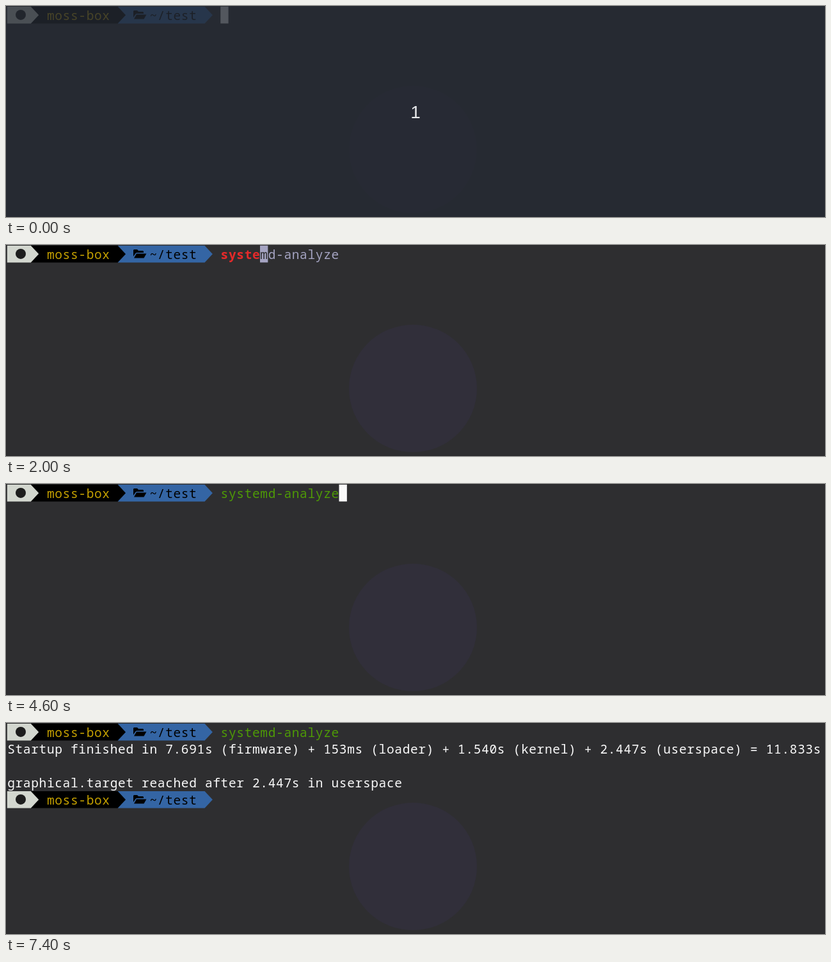
Animation of 1280x331 px, one loop 8000 ms. Source, as an HTML page with a canvas:

```html
<!DOCTYPE html>
<html lang="en">
<head>
<meta charset="utf-8">
<title>Terminal</title>
<style>
  html, body { margin: 0; width: 100%; height: 100%; overflow: hidden; background: #2e2e30; }
  canvas { display: block; }
</style>
</head>
<body>
<canvas id="stage" width="1280" height="331"></canvas>
<script>
const ctx = document.getElementById('stage').getContext('2d');
const W = 1280, H = 331, LOOP = 8000;
const LEFT = 1.8, TOP = 0.9, CELL = 12.35, ROW = 26.5;
const SIZE = 19.5, GAP = CELL - SIZE * 0.6;

const BG = '#2e2e30', EDGE = '#28282a', WHITE = '#fafafa', BLACK = '#000',
      LIGHT = '#d3d7cf', BLUE = '#3465a4', YELLOW = '#c4a000', RED = '#e52a2a',
      GREEN = '#4e9a06', GHOST = '#a5a4c2';

const HOST = 'moss-box', COMMAND = 'systemd-analyze', PROMPT_END = 27;
const OUTPUT = [
  [1, 'Startup finished in 7.691s (firmware) + 153ms (loader) + 1.540s (kernel) + 2.447s (userspace) = 11.833s'],
  [3, 'graphical.target reached after 2.447s in userspace']
];

// [start time, characters typed]
const KEYS = [[0, 0], [400, 1], [600, 2], [1400, 4], [2000, 5], [2200, 7], [2800, 9],
              [3000, 10], [3100, 11], [3700, 12], [4400, 14], [4600, 15]];
const SUGGEST_AT = 500, PRINT_AT = 5600, PROMPT_AT = 5700;
// cursor is hidden in these spans
const HIDDEN = [[1200, 1400], [5200, 5500], [6100, 6700], [7400, LOOP]];

const colX = col => LEFT + col * CELL;
const rowY = row => TOP + row * ROW;

function text(str, col, row, color, weight = 500) {
  ctx.font = `${weight} ${SIZE}px "Noto Sans Mono", "DejaVu Sans Mono", monospace`;
  ctx.letterSpacing = GAP + 'px';
  ctx.textAlign = 'left';
  ctx.fillStyle = color;
  ctx.fillText(str, colX(col) + GAP / 2, Math.round(rowY(row) + 20.9));
}

function block(col, row, color) {
  ctx.fillStyle = color;
  ctx.fillRect(colX(col), rowY(row), CELL, ROW);
}

function disc(x, y, r, color) {
  ctx.fillStyle = color;
  ctx.beginPath();
  ctx.arc(x, y, r, 0, Math.PI * 2);
  ctx.fill();
}

function polygon(points, color) {
  ctx.fillStyle = color;
  ctx.beginPath();
  points.forEach(([x, y]) => ctx.lineTo(x, y));
  ctx.closePath();
  ctx.fill();
}

// segment ending in an arrow one cell wide
function segment(from, to, row, color) {
  const x0 = colX(from), x1 = colX(to), y = rowY(row);
  polygon([[x0, y], [x1, y], [x1 + CELL, y + ROW / 2], [x1, y + ROW], [x0, y + ROW]], color);
}

function folder(x, y) {
  polygon([[x, y + 11], [x, y + 1], [x + 1, y], [x + 6, y], [x + 8, y + 2],
           [x + 15, y + 2], [x + 16, y + 3], [x + 16, y + 5], [x + 5, y + 5], [x + 3.5, y + 6]], BLACK);
  polygon([[x + 5, y + 6.5], [x + 20.5, y + 6.5], [x + 16.5, y + 13.5], [x + 1, y + 13.5]], BLACK);
}

function prompt(row) {
  const y = rowY(row);
  segment(14, 25, row, BLUE);
  segment(3, 14, row, BLACK);
  segment(0, 3, row, LIGHT);
  disc(23, y + 13, 8, '#1d1d1d');
  text(HOST, 5, row, YELLOW);
  folder(199, y + 6);
  text('~/test', 18, row, BLACK);
}

function commandLine(t, cursorOn) {
  const typed = KEYS.filter(k => k[0] <= t).pop()[1];
  const done = typed === COMMAND.length;
  const at = PROMPT_END + typed;
  const rest = t >= SUGGEST_AT ? COMMAND.slice(typed) : '';

  text(COMMAND.slice(0, typed), PROMPT_END, 0, done ? GREEN : RED, done ? 500 : 700);
  text(rest, at, 0, GHOST);
  if (cursorOn && t < PRINT_AT) {
    block(at, 0, rest ? GHOST : WHITE);
    text(rest.slice(0, 1), at, 0, BG);
  }
}

function countdown() {
  ctx.fillStyle = 'rgba(37, 42, 50, 0.78)';
  ctx.fillRect(0, 0, W, H);
  ctx.font = '28px "Liberation Sans", Arial, sans-serif';
  ctx.letterSpacing = '0px';
  ctx.textAlign = 'center';
  ctx.fillStyle = '#e8eaec';
  ctx.fillText('1', 640, 176);
}

function draw(t) {
  const cursorOn = !HIDDEN.some(([a, b]) => t >= a && t < b);
  ctx.fillStyle = BG;
  ctx.fillRect(0, 0, W, H);
  ctx.strokeStyle = EDGE;
  ctx.strokeRect(0.5, 0.5, W - 1, H - 1);
  disc(636, 225, 100, '#312f3a');

  prompt(0);
  commandLine(t, cursorOn);
  if (t >= PRINT_AT) {
    OUTPUT.forEach(([row, str]) => text(str, 0, row, WHITE));
    const ready = t >= PROMPT_AT;
    if (ready) prompt(4);
    if (cursorOn) block(ready ? PROMPT_END : 0, 4, WHITE);
  }
  if (t < 100) countdown();
}

const start = performance.now();
function tick() {
  draw((performance.now() - start) % LOOP);
  requestAnimationFrame(tick);
}
tick();
</script>
</body>
</html>
```
